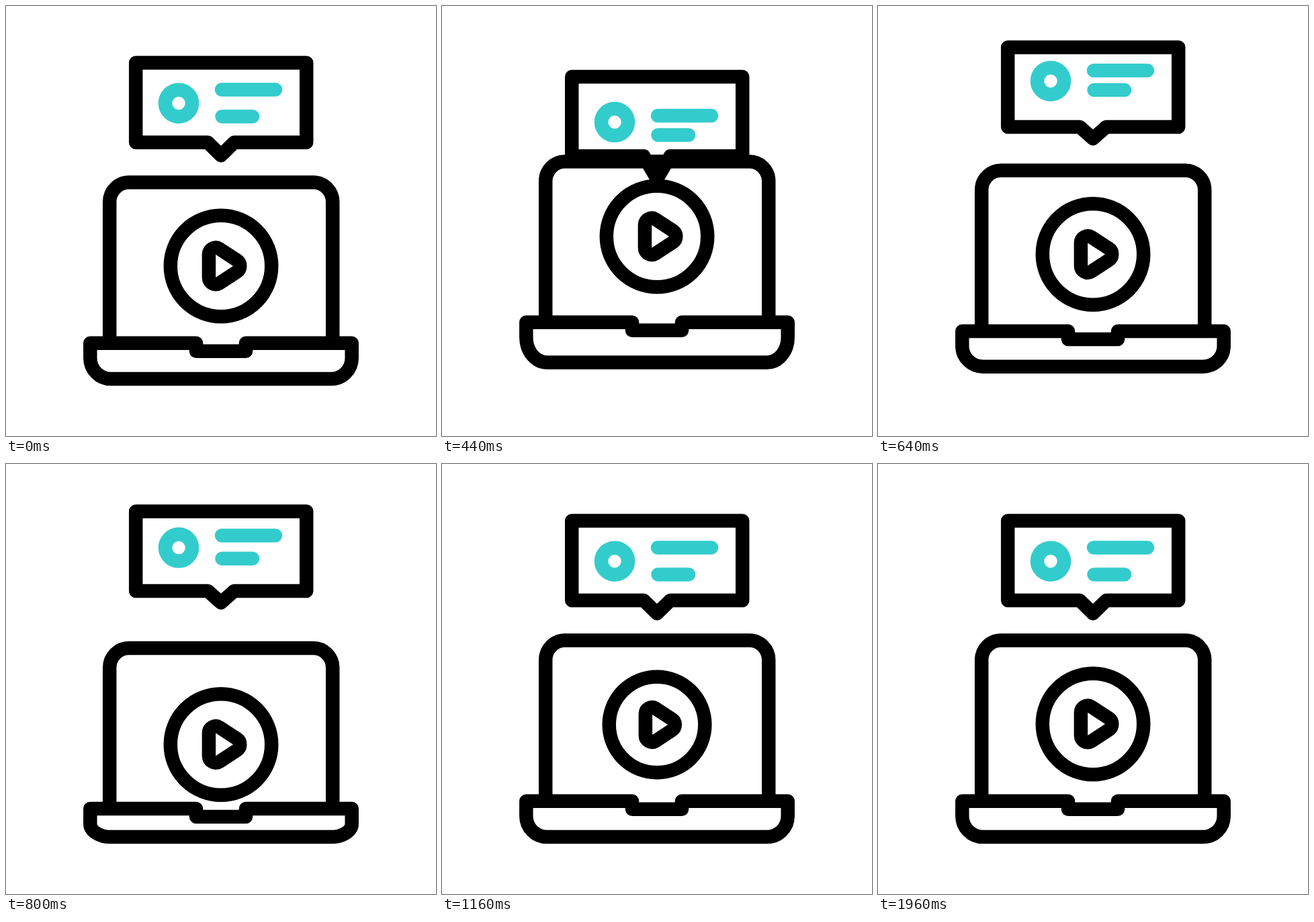
An HTML page for the animation above (2 s loop, 640 by 640 pixels).

```html
<!DOCTYPE html>
<html lang="en">
<head>
<meta charset="utf-8">
<title>Video message</title>
<style>
  html, body { margin: 0; width: 100%; height: 100%; overflow: hidden; background: #fff; }
  svg { display: block; width: 100%; height: 100%; }
</style>
</head>
<body>
<svg viewBox="0 0 640 640" fill="none" stroke="#000" stroke-width="20.5" stroke-linecap="round" stroke-linejoin="round">
  <path id="bubble"/>
  <g stroke="#3cc">
    <circle id="avatar" cx="257" cy="144.7" r="20"/>
    <path id="line1" d="M321 124.6H401"/>
    <path id="line2" d="M321.5 164.5H367"/>
  </g>
  <path id="screen" stroke-linecap="butt" d="M154.2 501.7V291.5a29 29 0 0 1 29-29H457.2a29 29 0 0 1 29 29V501.7"/>
  <path id="base"/>
  <g id="player">
    <circle cx="320" cy="387" r="75.2"/>
    <path d="M301.9 370A10.25 10.25 0 0 1 317.6 361.4L343.6 378.4A10.25 10.25 0 0 1 343.6 395.6L317.6 412.6A10.25 10.25 0 0 1 301.9 404Z"/>
  </g>
  <circle id="progress" cx="320" cy="387" r="75.2" pathLength="360" stroke="#3cc" stroke-width="23.2" transform="rotate(-81.7 320 387)"/>
</svg>
<script>
const LOOP = 2000, STEP = 40, STROKE = 20.5;
const el = id => document.getElementById(id);
const set = (id, name, value) => el(id).setAttribute(name, value);
const shift = (id, y) => set(id, 'transform', `translate(0 ${y})`);

// Eased value at time t through [time, value] keys
function track(t, ...keys) {
  if (t <= keys[0][0]) return keys[0][1];
  for (let i = 1; i < keys.length; i++) {
    const [t0, a] = keys[i - 1], [t1, b] = keys[i];
    if (t < t1) {
      const u = (t - t0) / (t1 - t0);
      return a + (b - a) * u * u * (3 - 2 * u);
    }
  }
  return keys[keys.length - 1][1];
}

function draw(t) {
  // The speech bubble drops, bounces up and settles
  const bounce = (low, high) => track(t, [80, 0], [480, low], [680, high], [920, 0]);
  const body = bounce(21.2, -28.2), tip = 222.4 + bounce(35.6, -32);
  const top = 84.6 + body, bottom = 203 + body;
  set('bubble', 'd', `M193.2 ${top}H447.2V${bottom}H339.7L320 ${tip}L300.3 ${bottom}H193.2Z`);
  shift('avatar', bounce(28.9, -40.2));
  shift('line1', bounce(39.7, -36.4));
  shift('line2', bounce(28.3, -47.4));

  // The laptop jumps, then squashes on landing
  const lift = track(t, [80, 0], [520, -34], [820, 12], [1000, 0]);
  const foot = track(t, [80, 0], [550, -28.5], [775, 0]);
  const y = 501.7 + lift, side = 524 + lift, ry = 555.1 + foot - side;
  shift('screen', lift);
  set('base', 'd', `M125.3 ${y}H283V${y + 12}H357V${y}H514.7V${side}
    a31 ${ry} 0 0 1 -31 ${ry}H156.3a31 ${ry} 0 0 1 -31 ${-ry}Z`);

  // The play button lags behind and is pressed
  const hop = track(t, [80, 0], [510, -47.4], [820, 31.4], [1000, 0]);
  const press = track(t, [960, 0], [1080, 1], [1200, 0]);
  const scale = 1 - 0.2 * press;
  set('player', 'transform', `translate(320 ${387 + hop + 4 * press}) scale(${scale}) translate(-320 -387)`);
  set('player', 'stroke-width', STROKE / scale);

  // The progress ring fills and empties clockwise
  const head = track(t, [1200, 0], [1640, 360]);
  const tail = track(t, [1440, 0], [1960, 360]);
  const length = head - tail;
  set('progress', 'visibility', length > 0 ? 'visible' : 'hidden');
  set('progress', 'stroke-dasharray', `${length} 400`);
  set('progress', 'stroke-dashoffset', -tail);
}

function frame() {
  draw(Math.floor(performance.now() % LOOP / STEP) * STEP);
  requestAnimationFrame(frame);
}
frame();
</script>
</body>
</html>
```
